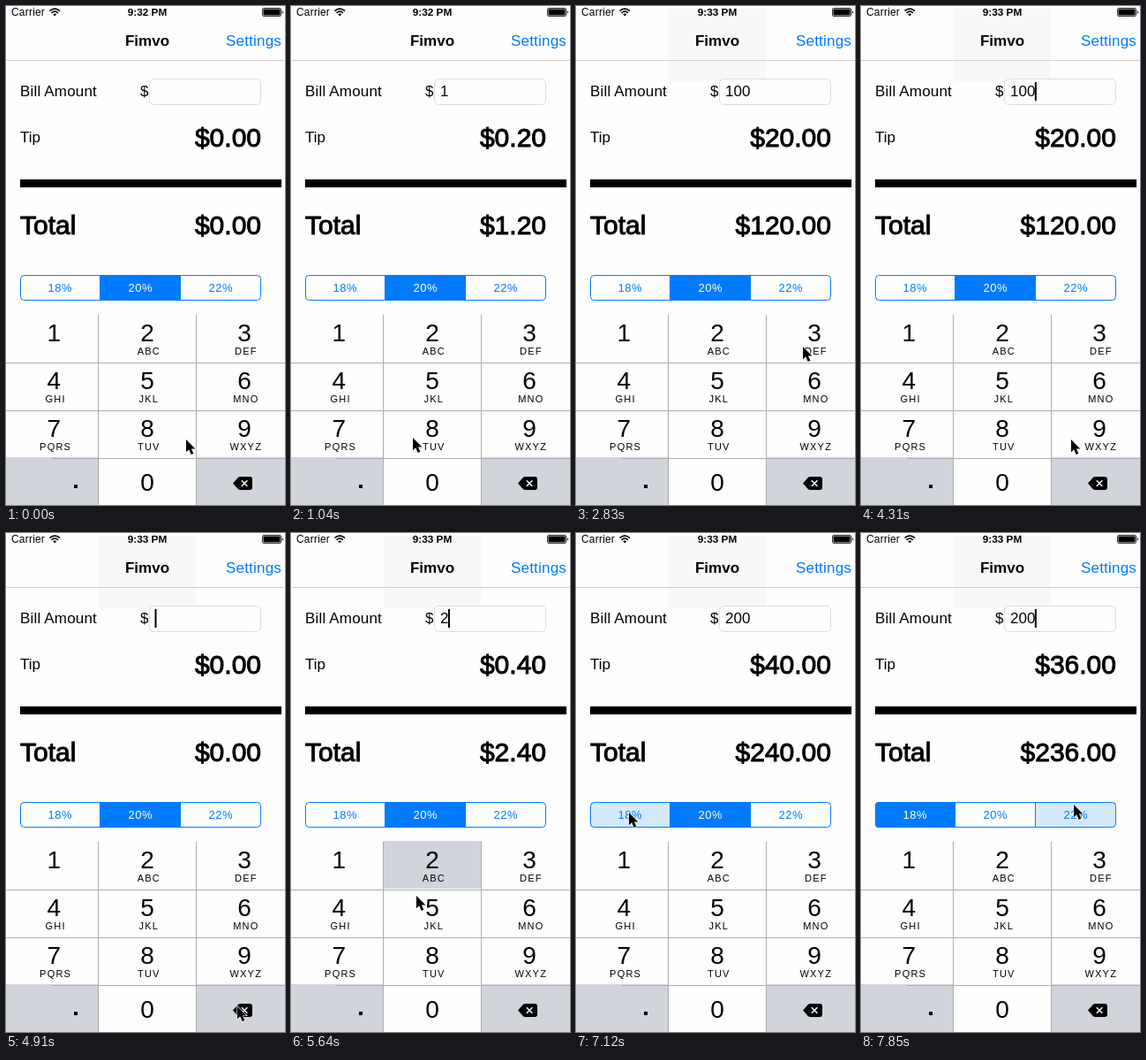
Write an HTML page that moves like this. It is 316x564 px and loops after 8 s.

```html
<!DOCTYPE html>
<html lang="en">
<head>
<meta charset="utf-8">
<title>Tip calculator</title>
<style>
  html, body { margin: 0; width: 100%; height: 100%; overflow: hidden; background: #fefefe; }
  svg { display: block; width: 100vw; height: 100vh; }
  text { font-family: "Liberation Sans", Arial, sans-serif; white-space: pre; }
</style>
</head>
<body>
<svg id="stage" viewBox="0 0 316 564"></svg>
<script>
const LOOP = 8000, STEP = 148.1;
const BLUE = '#007aff', TINT = '#d5e9fc', GREY = '#d1d4db', PAPER = '#fefefe', RULE = '#adadb0';
const stage = document.getElementById('stage');

function add(tag, attrs, parent = stage) {
  const el = document.createElementNS('http://www.w3.org/2000/svg', tag);
  for (const k in attrs) el.setAttribute(k, attrs[k]);
  return parent.appendChild(el);
}
const rect = (x, y, width, height, fill, more) => add('rect', { x, y, width, height, fill, ...more });
const path = (d, more, parent) => add('path', { d, ...more }, parent);
function label(str, x, y, size, more) {
  const el = add('text', { x, y, 'font-size': size, fill: '#000', ...more });
  el.textContent = str;
  return el;
}
const show = (el, on) => el.setAttribute('visibility', on ? 'visible' : 'hidden');
const mid = { 'text-anchor': 'middle' };
const medium = { stroke: '#000', 'stroke-width': 1 };

// Header
rect(0, 0, 316, 564, PAPER);
const veil = rect(105, 3, 110, 82, '#f8f8f8');
rect(0, 61, 316, 1, '#d0d0d2');
label('Carrier', 6, 11, 12, { 'letter-spacing': .2 });
path('M49.5 5.6Q55.2 .6 61 5.6M51.6 7.8Q55.2 4.5 58.9 7.8', { fill: 'none', stroke: '#000', 'stroke-width': 1.7 });
path('M53.2 9.3Q55.2 7.6 57.3 9.3L55.2 11.6Z');
const clock = label('', 160, 11, 11.8, { ...mid, 'font-weight': 'bold' });
rect(290.5, 2.5, 21, 9, 'none', { rx: 1.5, stroke: '#000', 'stroke-width': .8 });
rect(291.5, 3.5, 19, 7, '#000', { rx: .8 });
path('M312.8 5.2Q315.4 7 312.8 8.8Z');
label('Fimvo', 160, 45, 17, { ...mid, 'font-weight': 'bold' });
label('Settings', 249, 45, 17, { fill: BLUE, 'letter-spacing': .2 });

// Bill form
label('Bill Amount', 16, 102, 17, { 'letter-spacing': .18 });
label('$', 152, 102, 17);
rect(162.5, 82.5, 126, 29, PAPER, { rx: 5, stroke: '#dcdcdc' });
const bill = label('', 169, 102, 17);
const caret = rect(169, 86, 2, 21, '#000');
label('Tip', 16, 154, 17);
const tip = label('', 289, 158.5, 30, { ...medium, 'text-anchor': 'end' });
rect(16, 196, 296, 9, '#000');
label('Total', 16, 257.5, 30, medium);
const total = label('', 289, 257.5, 30, { ...medium, 'text-anchor': 'end' });

// Rate control
const rates = [18, 20, 22];
const clip = add('clipPath', { id: 'pill' });
add('rect', { x: 16, y: 304, width: 273, height: 29, rx: 4 }, clip);
const segments = rates.map((rate, i) => ({
  box: rect(16 + 91 * i, 304, 91, 29, PAPER, { 'clip-path': 'url(#pill)' }),
  text: label(rate + '%', 61.3 + 91 * i, 323, 13, { ...mid, 'letter-spacing': .6 })
}));
path('M106.5 304V333M197.5 304V333', { stroke: BLUE });
rect(16.5, 304.5, 272, 28, 'none', { rx: 4, stroke: BLUE });

// Keypad
const colX = [0, 105, 216, 316], midX = [54.3, 160, 270];
const rowY = r => 349 + 54 * r;
const keys = {};
['', 'ABC', 'DEF', 'GHI', 'JKL', 'MNO', 'PQRS', 'TUV', 'WXYZ', '.', '', '<'].forEach((sub, i) => {
  const c = i % 3, r = Math.floor(i / 3), x = midX[c], y = rowY(r);
  const name = i < 9 ? String(i + 1) : i === 10 ? '0' : sub;
  const rest = i === 9 || i === 11 ? GREY : PAPER;
  const box = rect(colX[c], y - 1, colX[c + 1] - colX[c], 55, rest);
  keys[name] = { box, rest, down: rest === GREY ? PAPER : GREY };
  if (rest === PAPER) label(name, x, y + (r === 3 ? 37 : 30), 28, mid);
  if (i < 9) label(sub, x + 1.8, y + 45, 11, { ...mid, 'letter-spacing': 1.2 });
});
rect(77, 541, 4, 4, '#000');
path('M257 539.5L263 532.8Q264 532 265.5 532H276Q279 532 279 535V544Q279 547 276 547H265.5Q264 547 263 546.2Z');
path('M266.8 536.2L273.4 542.8M273.4 536.2L266.8 542.8', { stroke: '#fff', 'stroke-width': 1.4 });
path('M104.5 349V564M215.5 349V564M0 403.5H316M0 457.5H316M52 511.5H316', { stroke: RULE });

const pointer = add('g', {});
path('M0 0V14.2L3.2 11.3L5.7 17L8.4 15.8L5.9 10.4H10.4Z', { stroke: '#fff', 'stroke-width': 1.2, 'paint-order': 'stroke' }, pointer);

// Pointer stops: step, x, y
const route = [
  [0, 204, 490], [1, 160, 440], [3, 60, 372], [5, 58, 372], [8, 178, 546], [9, 183, 547],
  [15, 183, 547], [17, 215, 480], [19, 257, 385], [22, 242, 318], [24, 242, 318],
  [27, 64, 340], [29, 238, 490], [31, 262, 535], [33, 262, 535], [36, 160, 368], [37, 155, 374],
  [38, 142, 410], [40, 153, 522], [41, 155, 531], [44, 155, 531], [48, 60, 316],
  [49, 62, 315], [53, 241, 307]
];
// Step from which each bill text holds
const typed = [[0, ''], [4, '1'], [10, '10'], [14, '100'], [30, '10'], [31, '1'], [32, ''], [37, '2'], [42, '20'], [43, '200']];
// Key, first step, last step
const presses = [['1', 3, 4], ['0', 9, 10], ['0', 14, 14], ['<', 30, 32], ['2', 36, 38], ['0', 41, 41], ['0', 43, 43]];
const caretOff = [[0, 2], [7, 8], [18, 20], [25, 27], [35, 35], [47, 49]];

const within = (n, a, b) => n >= a && n <= b;
const money = v => '$' + v.toFixed(2);

function place(n) {
  const i = route.findIndex(p => p[0] >= n);
  const b = route[i], a = route[Math.max(0, i - 1)];
  const k = b[0] === a[0] ? 0 : (n - a[0]) / (b[0] - a[0]);
  return [a[1] + (b[1] - a[1]) * k, a[2] + (b[2] - a[2]) * k];
}

function draw(t) {
  const n = Math.min(53, Math.floor((t + 1) / STEP));
  const value = typed.filter(e => e[0] <= n).pop()[1];
  const chosen = n >= 49 ? 0 : 1;
  const touched = n === 48 ? 0 : n === 53 ? 2 : -1;
  const amount = Number(value), extra = amount * rates[chosen] / 100;

  clock.textContent = n >= 10 ? '9:33 PM' : '9:32 PM';
  show(veil, n >= 10);
  bill.textContent = value;
  caret.setAttribute('x', 168.5 + value.length * 9.45);
  show(caret, !caretOff.some(([a, b]) => within(n, a, b)));
  tip.textContent = money(extra);
  total.textContent = money(amount + extra);

  segments.forEach((s, i) => {
    s.box.setAttribute('fill', i === chosen ? BLUE : i === touched ? TINT : PAPER);
    s.text.setAttribute('fill', i === chosen ? '#fff' : BLUE);
  });
  for (const name in keys) {
    const key = keys[name];
    const down = presses.some(([k, a, b]) => k === name && within(n, a, b));
    key.box.setAttribute('fill', down ? key.down : key.rest);
  }
  pointer.setAttribute('transform', `translate(${place(n)})`);
}

const start = performance.now();
function tick() {
  draw((performance.now() - start) % LOOP);
  requestAnimationFrame(tick);
}
tick();
</script>
</body>
</html>
```
